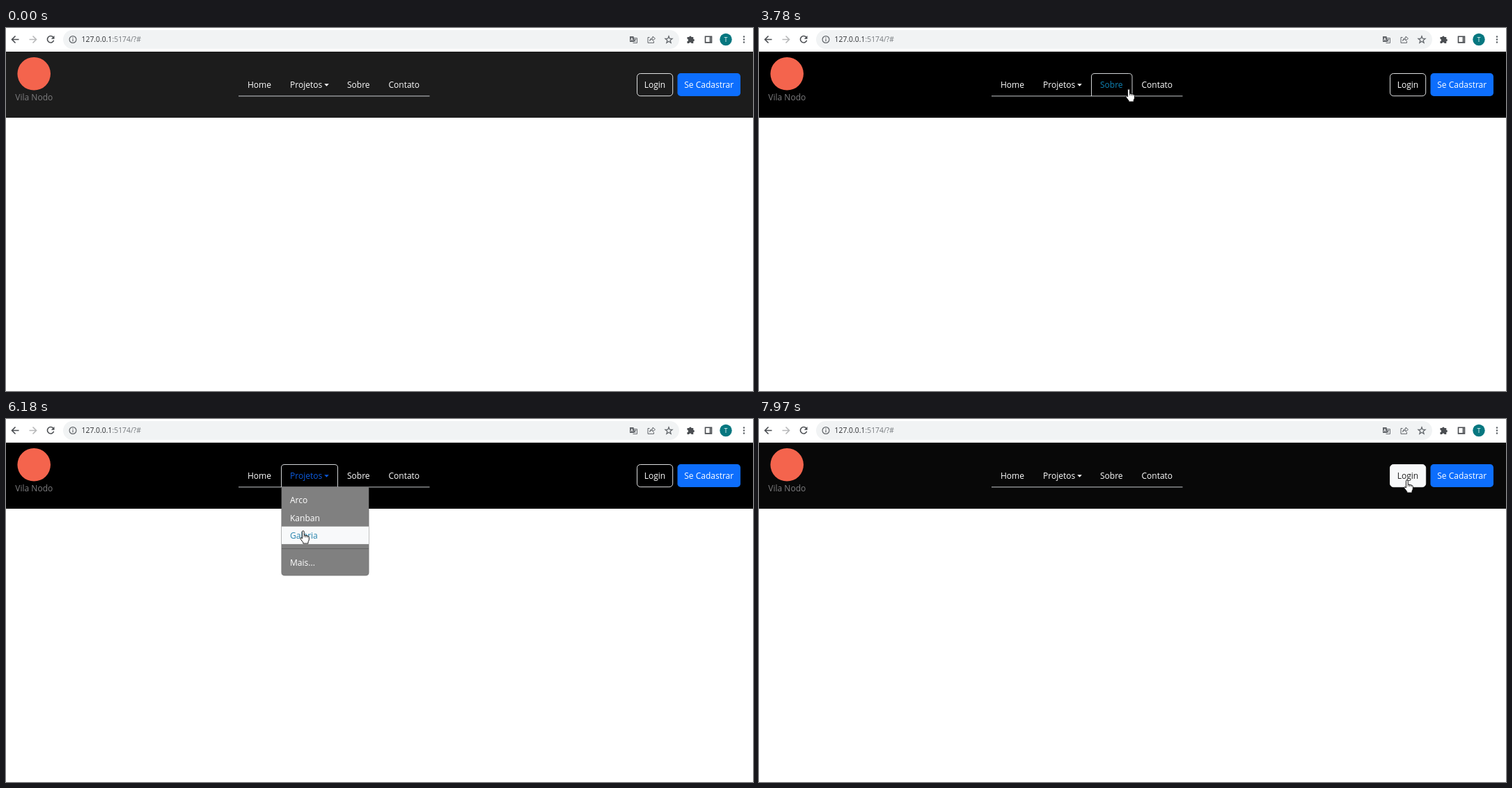
These frames come from a looping animation (1073x522 px, 8000 ms). An HTML page:

```html
<!DOCTYPE html>
<html lang="pt-BR">
<head>
<meta charset="utf-8">
<title>Menu</title>
<style>
  html, body { margin: 0; width: 100%; height: 100%; overflow: hidden; background: #fff; }
  svg { display: block; width: 1073px; height: 522px; font: 500 12px "Open Sans", "Noto Sans", sans-serif; }
  .thin { font-weight: 400; }
  .icon { fill: none; stroke: #5f6368; stroke-width: 1.2; }
  .dark { stroke: #4a4d51; stroke-width: 1.6; }
</style>
</head>
<body>
<svg viewBox="0 0 1073 522" fill="#fff">
  <!-- browser toolbar -->
  <rect width="1073" height="34"/>
  <rect x="82" y="3" width="885" height="27" rx="13.5" fill="#f1f3f4"/>
  <g class="icon">
    <path id="back" class="dark" d="M18.500 16.500H8.500M13.500 11.500L8.500 16.500L13.500 21.500"/>
    <use href="#back" transform="matrix(-1 0 0 1 52 0)" opacity=".4"/>
    <path class="dark" d="M67.800 13.300A4.700 4.700 0 1 0 68.600 17.800"/>
    <path d="M69.500 11V15.700H64.800Z" fill="#4a4d51" stroke="none"/>
    <circle cx="96" cy="16.500" r="4.900"/>
    <path d="M96 15.800V19.300M96 13.500V14.800"/>
    <path d="M901.500 14.500H906.500V21.500H900.500M902.300 16.500H905.500M904 15.500Q904 18.500 902 19.500M902.600 17.500L905 19.800" stroke-width=".9"/>
    <path d="M896 12H901.500L903 20H896Z" fill="#5f6368" stroke="none"/>
    <path d="M897.300 18.300L898.900 14L900.500 18.300M897.900 16.800H899.900" stroke="#fff" stroke-width=".8"/>
    <path d="M924.500 13.500H922V21.300H930.500V19M924.500 18.500Q925 14.500 929 14.300V12L932.500 15.200L929 18.300V16.200Q926.500 16 924.500 18.500Z" stroke-width="1"/>
    <path id="star"/>
    <path d="M978.500 13H981.300A1.600 1.600 0 0 1 984.500 13H987.300V15.800A1.600 1.600 0 0 1 987.300 19V22H984.500A1.600 1.600 0 0 0 981.300 22H978.500V19A1.600 1.600 0 0 0 978.500 15.800Z" fill="#4a4d51" stroke="none"/>
    <path class="dark" d="M1004.500 12.300H1013.500V20.900H1004.500ZM1011.500 12V21"/>
    <path d="M1060 12.500V21" stroke-width="2.500" stroke-linecap="round" stroke-dasharray="0 4"/>
  </g>
  <circle cx="1034" cy="16.500" r="8.700" fill="#067780"/>
  <text class="thin" x="1034" y="20" font-size="9" text-anchor="middle">T</text>
  <text class="thin" x="108.500" y="20.300" font-size="10.400" fill="#2b2d30">127.0.0.1<tspan fill="#74787c">:5174/?#</tspan></text>

  <!-- page header -->
  <rect id="bar" y="34" width="1073" height="95"/>
  <circle cx="40.200" cy="65.800" r="23.800" fill="#f4644d"/>
  <text class="thin" x="40.300" y="103.700" text-anchor="middle" fill="#7d7d7f">Vila Nodo</text>
  <path d="M334 97.900H608.500" stroke="#dee2e6" stroke-width=".9"/>
  <g id="tabs"></g>
  <rect id="login" x="906.500" y="65.500" width="51.200" height="32.200" rx="4.800" stroke="#f8f9fa" stroke-width=".9"/>
  <text id="loginText" x="932" y="86.300" text-anchor="middle">Login</text>
  <rect x="964.500" y="65" width="90.500" height="33" rx="4.800" fill="#0d6efd"/>
  <text x="1009.700" y="86.300" text-anchor="middle">Se Cadastrar</text>

  <g id="menu">
    <path d="M395.600 97.700H521.300V220.500Q521.300 225.300 516.500 225.300H400.400Q395.600 225.300 395.600 220.500Z" fill="#808080" stroke="#000" stroke-opacity=".175" stroke-width=".8"/>
    <path d="M396 186.500H521" stroke="#606060" stroke-width=".9"/>
    <g id="rows"></g>
  </g>

  <circle id="ring" r="10" fill="#808080" opacity=".25"/>
  <g id="cursor" stroke="#000" stroke-width=".9" stroke-linejoin="round">
    <path id="arrow" d="M0 0V12L2.800 9.500L4.700 14L6.600 13.200L4.700 8.800H8.600Z"/>
    <g id="hand">
      <path d="M-1.600 11V1.200C-1.600 -.6 1.200 -.6 1.200 1.200V6L6.500 7.200Q8.300 7.700 8.300 9.500V12Q8.300 14 7 15.500V18H-.2V16.500L-4 11.500Q-4.600 9.800 -3.200 9.600Q-2.600 9.600 -1.600 11Z"/>
      <path d="M1.200 6V9M3.600 6.600V9.300M6 7.200V9.600" fill="none" stroke-width=".7"/>
    </g>
  </g>
</svg>
<script>
const LOOP = 8000, PRESS = 110, FADE = 700, GREY = 28;
const [FIRST_CLICK, OPEN_CLICK, CLOSE_CLICK] = [860, 5090, 6700];

// places the pointer rests at: arrival time, x, y
const STOPS = [
  [390, 949, 494], [600, 876, 365], [1960, 335, 108], [2950, 404, 84],
  [3440, 505, 88], [4000, 580, 88], [4400, 468, 106], [4610, 443, 98],
  [4890, 437, 86], [6180, 427, 161], [6600, 664, 232], [7220, 782, 171], [7660, 931, 88]
];

const $ = id => document.getElementById(id);
const between = (v, a, b) => v >= a && v < b;
const clamp = v => Math.min(1, Math.max(0, v));
const smooth = p => p * p * (3 - 2 * p);
const show = (el, on) => el.setAttribute("visibility", on ? "visible" : "hidden");
const paint = (el, colour) => el.setAttribute("fill", colour);

function add(parent, markup) {
  $(parent).insertAdjacentHTML("beforeend", `<g>${markup}</g>`);
  return $(parent).lastElementChild;
}

const starPoints = Array.from({ length: 10 }, (_, i) => {
  const r = i % 2 ? 2.2 : 5.3, a = i * Math.PI / 5;
  return `${952 + r * Math.sin(a)} ${17 - r * Math.cos(a)}`;
});
$("star").setAttribute("d", `M${starPoints.join("L")}Z`);

let edge = 334;
const tabs = [["Home", 61], ["Projetos", 82], ["Sobre", 59.5], ["Contato", 72]].map(([label, width]) => {
  const left = edge, right = edge += width;
  const caret = label === "Projetos" ? '<path d="M457.200 80.300h6.600l-3.300 3.400z"/>' : "";
  const el = add("tabs", `
    <path d="M${left + .5} 98V70q0 -4.500 4.500 -4.500H${right - 5}q4.500 0 4.500 4.500V98" fill="none" stroke="#e9ecef" stroke-width=".9"/>
    <text x="${left + 13}" y="86.300">${label}</text>${caret}`);
  return { label, left, right, el };
});

const rows = ["Arco", "Kanban", "Galeria", "Mais..."].map((label, i) => {
  const gap = label === "Mais..." ? 13.5 : 0;
  const top = 104 + 25.3 * i + gap;
  const el = add("rows", `
    <rect x="396" y="${top}" width="125" height="25.300" fill="#f8f9fa"/>
    <text x="408" y="${top + 17.2}">${label}</text>`);
  return { top, bottom: top + 25.3, el };
});

// rest first, then glide to the next stop in the last part of the gap
function pointerAt(t) {
  const i = STOPS.findIndex(stop => stop[0] > t);
  if (i === 0) return [-99, -99];
  if (i < 0) return STOPS[STOPS.length - 1].slice(1);
  const [t0, x0, y0] = STOPS[i - 1], [t1, x1, y1] = STOPS[i];
  const glide = Math.min(700, .65 * (t1 - t0));
  const k = smooth(clamp(1 - (t1 - t) / glide));
  return [x0 + (x1 - x0) * k, y0 + (y1 - y0) * k];
}

const menuOpen = t => between(t, OPEN_CLICK + PRESS, CLOSE_CLICK + PRESS);

function overHeader(t) {
  const [x, y] = pointerAt(t);
  return between(y, 34, 129) || menuOpen(t) && between(x, 396, 521) && between(y, 98, 225);
}

// the bar darkens while hovered and snaps back on leaving
function barGrey(t) {
  let hovered = 0;
  while (hovered < FADE && overHeader(t - hovered)) hovered += 5;
  return GREY * (1 - smooth(clamp(hovered / FADE)));
}

function draw(t) {
  const [x, y] = pointerAt(t);
  const open = menuOpen(t);
  const onTabs = between(y, 65, 98);
  let link = false;

  for (const tab of tabs) {
    const over = onTabs && between(x, tab.left, tab.right);
    const active = open && tab.label === "Projetos";
    link ||= over;
    show(tab.el.firstElementChild, over || active);
    paint(tab.el, active ? "#0d5ce0" : over ? "#0f83b5" : "#fff");
  }

  show($("menu"), open);
  for (const row of rows) {
    const over = open && between(x, 396, 521) && between(y, row.top, row.bottom);
    link ||= over;
    show(row.el.firstElementChild, over);
    paint(row.el, over ? "#2583ad" : "#fff");
  }

  const onLogin = onTabs && between(x, 906, 958);
  link ||= onLogin;
  paint($("login"), onLogin ? "#f8f9fa" : "none");
  paint($("loginText"), onLogin ? "#222" : "#fff");

  const grey = barGrey(t);
  paint($("bar"), `rgb(${grey},${grey},${grey})`);

  for (const id of ["cursor", "ring"]) $(id).setAttribute("transform", `translate(${x} ${y})`);
  show($("arrow"), !link);
  show($("hand"), link);
  show($("ring"), [FIRST_CLICK, OPEN_CLICK, CLOSE_CLICK].some(c => between(t, c, c + PRESS)));
}

const start = performance.now();
function tick(now) {
  draw(Math.max(0, now - start) % LOOP);
  requestAnimationFrame(tick);
}
draw(0);
requestAnimationFrame(tick);
</script>
</body>
</html>
```
